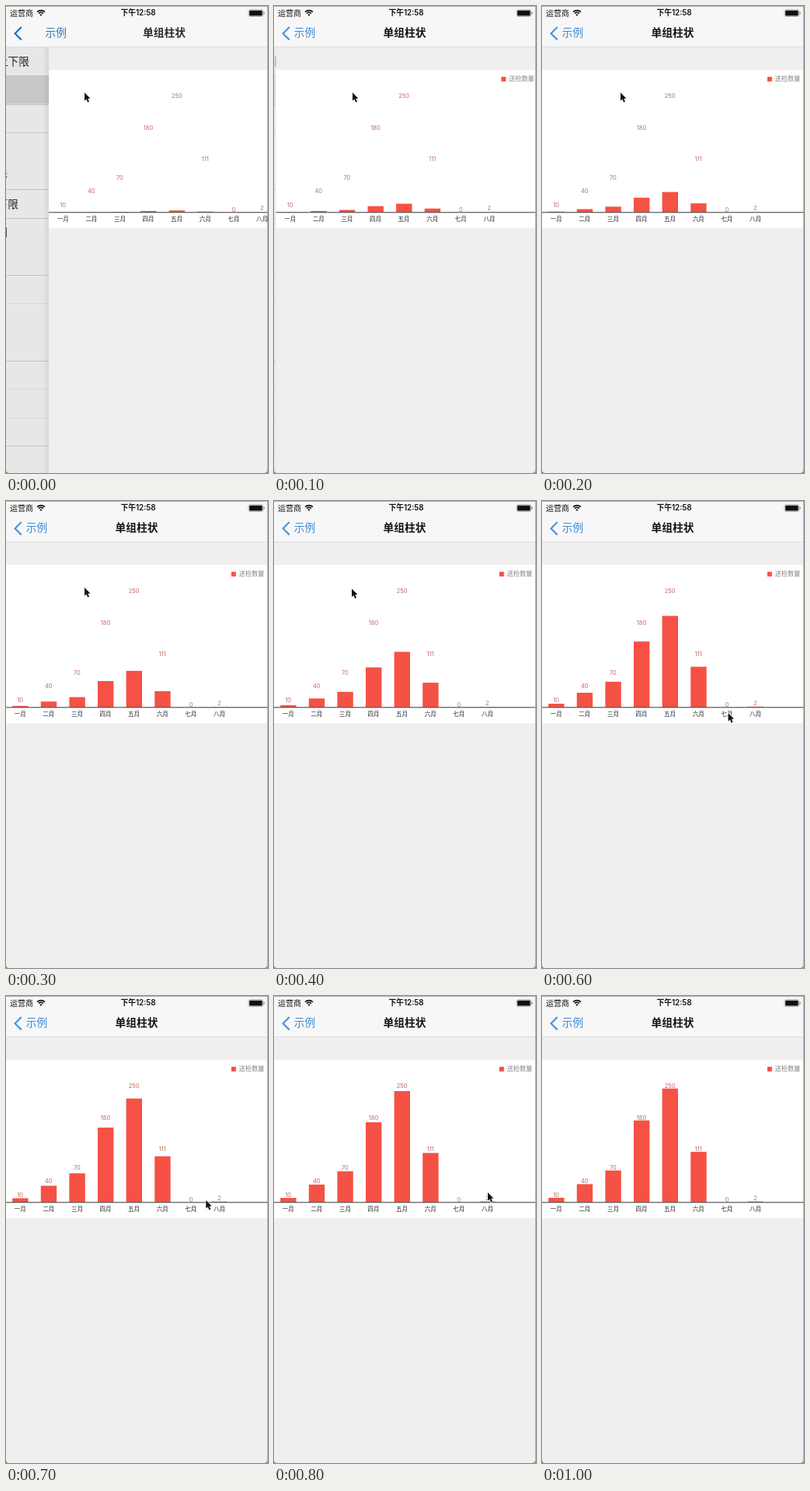
Recreate the animation shown at these times as an HTML page with a canvas. Size 337 by 599 pixels, loop 1.1 s.

```html
<!DOCTYPE html>
<html lang="zh-CN">
<head>
<meta charset="utf-8">
<title>单组柱状</title>
<style>
  html, body { margin: 0; width: 100%; height: 100%; overflow: hidden; background: #efefef; }
  canvas { display: block; width: 337px; height: 599px; }
</style>
</head>
<body>
<canvas id="stage"></canvas>
<script>
const W = 337, H = 599, LOOP = 1100, STEP = 100;
const FONT = 'Inter, "Noto Sans CJK SC", "Noto Sans CJK", sans-serif';
const RED = '#f55145';
const BASE = 264.7, UNIT = 0.584, PITCH = 36.6;
const values = [10, 40, 70, 180, 250, 111, 0, 2];
const months = [...'一二三四五六七八'].map(c => c + '月');

const canvas = document.getElementById('stage');
const dpr = window.devicePixelRatio || 1;
canvas.width = Math.round(W * dpr);
canvas.height = Math.round(H * dpr);
const ctx = canvas.getContext('2d');
ctx.scale(dpr, dpr);
ctx.textBaseline = 'middle';

function rect(x, y, w, h, color) {
  ctx.fillStyle = color;
  ctx.fillRect(x, y, w, h);
}

function text(str, x, y, size, color, align = 'left', weight = 400) {
  ctx.font = `${weight} ${size}px ${FONT}`;
  ctx.textAlign = align;
  ctx.fillStyle = color;
  ctx.fillText(str, x, y);
}

// Ease-in-out curve, cubic-bezier(.42, 0, .58, 1)
function easeInOut(x) {
  if (x <= 0) return 0;
  if (x >= 1) return 1;
  let lo = 0, hi = 1;
  for (let i = 0; i < 24; i++) {
    const s = (lo + hi) / 2, r = 1 - s;
    const bx = 1.26 * r * r * s + 1.74 * r * s * s + s * s * s;
    if (bx < x) lo = s; else hi = s;
  }
  return lo * lo * (3 - 2 * lo);
}

// Horizontal offset of the incoming page
function pageShift(t) {
  return t < 100 ? 55 : t < 200 ? 2.5 : 0;
}

// Pointer keys: time, x, y
const path = [[0, 101, 111], [300, 101, 111], [400, 100, 112.5],
              [600, 239.5, 272], [800, 275, 252]];

function pointerAt(t) {
  if (t > 800) return null;
  let i = 0;
  while (i < path.length - 2 && t > path[i + 1][0]) i++;
  const [t0, x0, y0] = path[i], [t1, x1, y1] = path[i + 1];
  const k = (t - t0) / (t1 - t0);
  return [x0 + (x1 - x0) * k, y0 + (y1 - y0) * k];
}

function drawList(shift) {
  const dx = (shift - 55) * 0.3;
  const row = y => 52.5 + 36.55 * y;
  ctx.save();
  ctx.beginPath();
  ctx.rect(0, 0, shift, H);
  ctx.clip();
  rect(0, 0, shift, H, '#e7e7e7');
  rect(0, row(1), shift, 36.5, shift > 10 ? '#c8c8c8' : '#dedede');
  for (const n of [1, 2, 3, 5, 6, 8, 9, 11, 12, 13, 14]) {
    const faint = n === 9 || n === 12 || n === 13;
    rect(0, Math.round(row(n)), shift, 1, faint ? '#d8d8d8' : '#c3c3c3');
  }
  const items = [['上下限', 30, 72], ['形', 2, 217.5], ['下限', 16, 254.5], ['图', 2, 291]];
  for (const [str, x, y] of items) text(str, x + dx, y, 13.7, '#222', 'right');
  if (shift > 10) {
    const shade = ctx.createLinearGradient(shift - 8, 0, shift, 0);
    shade.addColorStop(0, 'rgba(0,0,0,0)');
    shade.addColorStop(1, 'rgba(0,0,0,.07)');
    rect(shift - 8, 52, 8, H, shade);
  }
  ctx.restore();
}

function drawChart(shift, grow) {
  ctx.save();
  ctx.translate(shift, 0);
  rect(0, 53, W, H, '#efefef');
  rect(0, 82, W, 203, '#fff');
  values.forEach((v, i) => {
    const h = v * UNIT * grow;
    rect(8.2 + PITCH * i, BASE - h, 20.4, h, RED);
  });
  rect(0, 264.2, W, 1.1, '#4a4a4a');
  values.forEach((v, i) => {
    const x = 18.2 + PITCH * i;
    text(v, x, BASE - 3.3 - v * UNIT, 7.5, '#c4685e', 'center');
    text(months[i], x, 273.3, 7.5, '#222', 'center');
  });
  rect(289.8, 90.8, 6, 6, RED);
  text('送检数量', 299.5, 94, 8.2, '#858585');
  ctx.restore();
}

function drawStatus() {
  text('运营商', 5, 9.5, 10, '#111');
  text('下午12:58', 170, 9.5, 9.8, '#111', 'center', 600);

  ctx.strokeStyle = ctx.fillStyle = '#111';
  ctx.lineWidth = 1.6;
  for (const r of [4.2, 7]) {
    ctx.beginPath();
    ctx.arc(45, 12.6, r, Math.PI * 1.25, Math.PI * 1.75);
    ctx.stroke();
  }
  ctx.beginPath();
  ctx.moveTo(45, 13);
  ctx.arc(45, 12.6, 2.2, Math.PI * 1.25, Math.PI * 1.75);
  ctx.fill();

  ctx.lineWidth = 0.6;
  ctx.strokeStyle = '#777';
  ctx.beginPath();
  ctx.roundRect(312, 4.8, 18.6, 8.6, 2);
  ctx.stroke();
  ctx.fillStyle = '#111';
  ctx.beginPath();
  ctx.roundRect(313, 5.8, 16.6, 6.6, 1.2);
  ctx.fill();
  rect(331.4, 7.6, 1.1, 3, '#777');
}

function drawNav(t) {
  const sliding = t < 100;
  rect(0, 0, W, 52, '#f7f7f7');
  rect(0, 52, W, 1, '#dedede');
  rect(0, 0, W, 0.8, '#999');
  drawStatus();
  ctx.strokeStyle = sliding ? '#1f72c9' : '#4a96e0';
  ctx.lineWidth = 2.2;
  ctx.beginPath();
  ctx.moveTo(19.8, 27);
  ctx.lineTo(11.6, 35.2);
  ctx.lineTo(19.8, 43.4);
  ctx.stroke();
  text('示例', sliding ? 50.5 : 25.8, 35.3, 13.7, sliding ? '#3575b9' : '#3c8bd8');
  text('单组柱状', sliding ? 203.5 : 168, 35.3, 13.7, sliding ? '#2b2b2b' : '#111', 'center', 600);
}

function drawPointer([x, y]) {
  const shape = [[0, 0], [0, 10.6], [2.4, 8.5], [4.1, 12.4], [6, 11.6], [4.3, 7.8], [7.4, 7.6]];
  ctx.beginPath();
  shape.forEach(([px, py]) => ctx.lineTo(x + px, y + py));
  ctx.closePath();
  ctx.lineWidth = 1.4;
  ctx.lineJoin = 'round';
  ctx.strokeStyle = '#fff';
  ctx.stroke();
  ctx.lineJoin = 'miter';
  ctx.fillStyle = '#111';
  ctx.fill();
}

function drawEdge() {
  ctx.fillStyle = '#777';
  for (const [x, dir] of [[0, 1], [336, -1]]) {
    ctx.beginPath();
    ctx.moveTo(x, H - 4);
    ctx.quadraticCurveTo(x, H, x + 4 * dir, H);
    ctx.lineTo(x, H);
    ctx.fill();
  }
  rect(336, 0, 1, H, '#35f04a');
}

function draw(t) {
  const shift = pageShift(t);
  ctx.clearRect(0, 0, W, H);
  if (shift) drawList(shift);
  drawChart(shift, easeInOut((t + 93) / 1000));
  drawNav(t);
  const pointer = pointerAt(t);
  if (pointer) drawPointer(pointer);
  drawEdge();
}

let start = null;
function tick(now) {
  if (start === null) start = now;
  const t = Math.max(0, now - start) % LOOP;
  draw(Math.floor(t / STEP) * STEP);
  requestAnimationFrame(tick);
}
draw(0);
requestAnimationFrame(tick);
</script>
</body>
</html>
```
